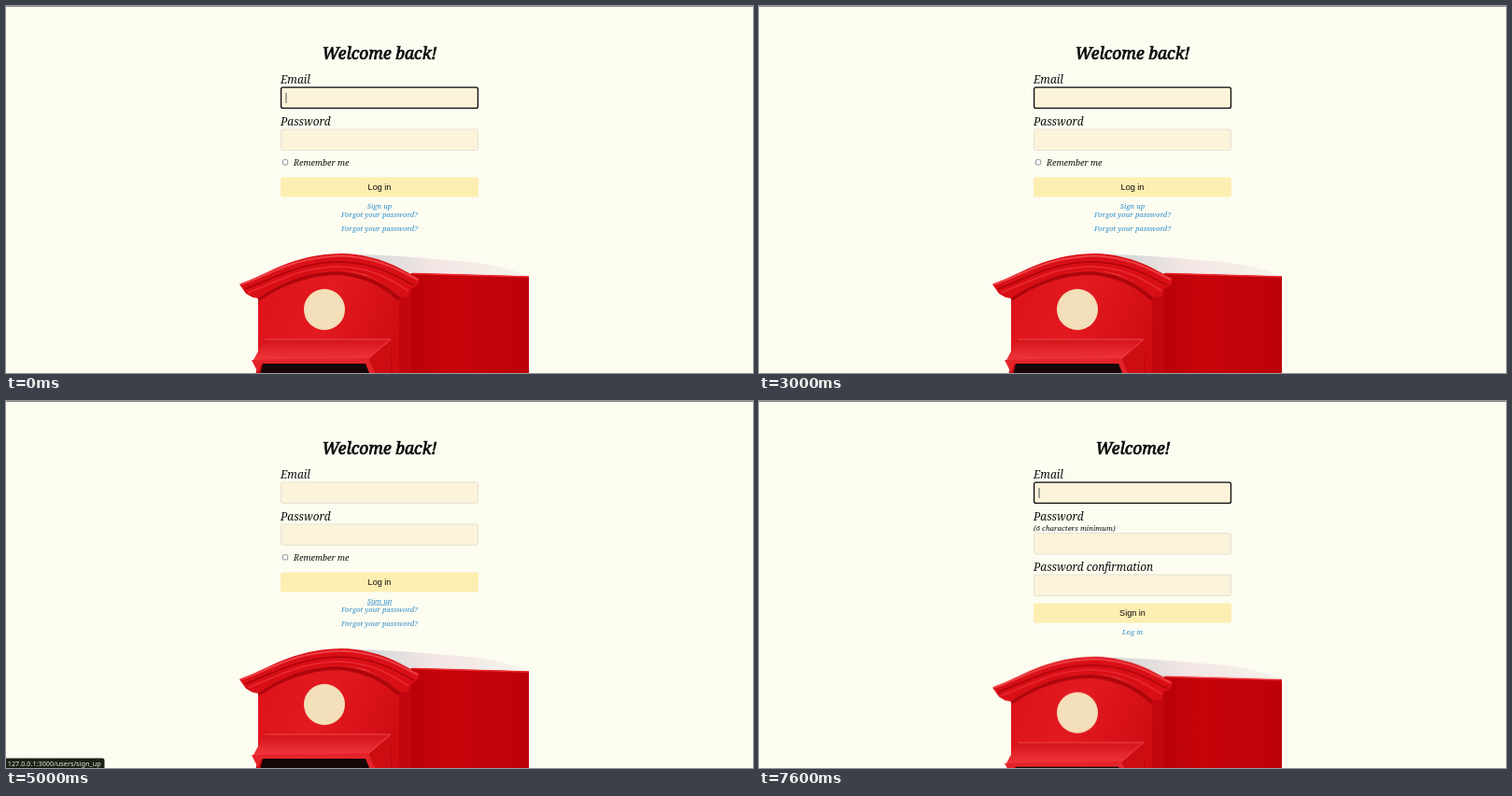
An HTML page for the animation above (8000 ms loop, 800 px wide and 393 px high).

```html
<!DOCTYPE html>
<html lang="en">
<head>
<meta charset="utf-8">
<title>Welcome back</title>
<style>
  html, body { margin: 0; width: 100%; height: 100%; overflow: hidden; background: #fdfcf1; }
  svg { display: block; width: 100vw; height: 100vh; }

  text { font-family: "Noto Serif", serif; font-style: italic; fill: #0c0c0c; }
  .title { font-size: 17.5px; text-anchor: middle; stroke: #0c0c0c; stroke-width: .7px; }
  .label { font-size: 11.8px; }
  .remember { font-size: 9px; }
  .hint { font-size: 7.8px; }
  .link { font-size: 7.65px; text-anchor: middle; fill: #2b8ccb; }
  .button { font: 9.1px "Liberation Sans", Arial, sans-serif; text-anchor: middle; }
  .status text { font: 7.28px "Noto Sans", sans-serif; fill: #e9ebe4; }

  .field { fill: #fbf4da; stroke: #dfdccd; stroke-width: .8; }
  .ring { fill: none; stroke: #0a0a0a; stroke-width: 1.3; }
  .face { fill: #fdeeb1; }

  .login, .signup, .ring, .caret, .status, .hover, .signlink, .box {
    animation: 8s step-end infinite;
  }
  .login { animation-name: login; }
  .signup { animation-name: signup; }
  .box { animation-name: drop; }
  .ring { animation-name: focus; }
  .caret { animation-name: blink; }
  .status { animation-name: status; }
  .hover { animation-name: hover; }
  .signlink { animation-name: underline; }

  @keyframes login { 0% { opacity: 1 } 65%, 100% { opacity: 0 } }
  @keyframes signup { 0% { opacity: 0 } 65%, 100% { opacity: 1 } }
  @keyframes drop { 0% { transform: none } 65%, 100% { transform: translateY(8.7px) } }
  @keyframes focus { 0%, 65%, 100% { opacity: 1 } 62.5% { opacity: 0 } }
  @keyframes blink {
    0%, 15%, 30%, 45%, 60%, 65%, 80%, 95%, 100% { opacity: 1 }
    7.5%, 22.5%, 37.5%, 52.5%, 62.5%, 72.5%, 87.5% { opacity: 0 }
  }
  @keyframes status {
    0%, 72.5%, 100% { opacity: 0 }
    60%, 70% { opacity: .55 }
    62.5% { opacity: 1 }
  }
  @keyframes hover {
    0%, 60%, 100% { opacity: 0 }
    52.5%, 57.5% { opacity: .5 }
    55% { opacity: 1 }
  }
  @keyframes underline {
    0%, 65%, 100% { text-decoration-line: none }
    57.5% { text-decoration-line: underline }
  }
</style>
</head>
<body>
<svg viewBox="0 0 800 393" preserveAspectRatio="none">
  <defs>
    <linearGradient id="front" x2="1" y2=".3">
      <stop stop-color="#dd1219"/><stop offset=".5" stop-color="#e31a20"/><stop offset="1" stop-color="#d00c13"/>
    </linearGradient>
    <linearGradient id="side" x2="1">
      <stop stop-color="#b90208"/><stop offset=".3" stop-color="#c6040a"/><stop offset="1" stop-color="#be0209"/>
    </linearGradient>
    <linearGradient id="top" x2="1">
      <stop stop-color="#cfd6d6"/><stop offset=".45" stop-color="#f3e6e4"/><stop offset="1" stop-color="#f6f3ec"/>
    </linearGradient>
    <linearGradient id="hood" x2="0" y2="1">
      <stop stop-color="#d3141a"/><stop offset="1" stop-color="#f0363b"/>
    </linearGradient>
  </defs>

  <rect width="800" height="393" fill="#fdfcf1"/>
  <rect width="800" height="1" fill="#8b8b87"/>

  <!-- pillar box -->
  <g class="box">
    <path d="M376 266 Q420 267 470 272 Q530 275 560 290 L436 288Z" fill="url(#top)"/>
    <path d="M434 286 L560 289.5V400H434Z" fill="url(#side)"/>
    <path d="M436 286.5 L560 290" stroke="#ee2b31" stroke-width="1.6"/>
    <path d="M270 309 Q310 283 353 282 Q394 285 423 309 L434 300V400H270Z" fill="url(#front)"/>
    <path d="M421 311 L434 300V400H421Z" fill="#c2070e"/>
    <path d="M270 314 Q310 287 354 286 Q393 288 421 314" fill="none" stroke="#ad060c" stroke-width="4"/>
    <path d="M250 298 C281 287 306 266 359 265 C401 266 425 283 443 292 L441 299 434 303 431 311 423 312
             C400 290 379 284 353 283 C322 284 292 298 270 313 L264 312 257 308Z" fill="#d90f16"/>
    <path d="M252 298 C284 287 308 269 359 267.500 C400 269 424 285 441 293" fill="none" stroke="#f04045" stroke-width="2"/>
    <path d="M256 303 C289 291 312 275 358 274 C397 275 419 290 437 299" fill="none" stroke="#a9060c" stroke-width="1.500"/>
    <path d="M259 307 C292 295 314 280 356 279 C393 280 412 293 431 305" fill="none" stroke="#ea2a30" stroke-width="1.600"/>
    <circle cx="341" cy="325" r="22" fill="#f3dfb9"/>
    <path d="M276 357 L412 357 414 400H266Z" fill="#bd080e"/>
    <path d="M277 357H412L388 378 265 379Z" fill="url(#hood)"/>
    <path d="M412 357 L388 378 398 400H412Z" fill="#ce0d13"/>
    <path d="M263 379 L388 377 398 400H390L385 383H274L270 393Z" fill="#e3242a"/>
    <path d="M275 383H385L392 400H271Z" fill="#160607"/>
    <path d="M277 357H412L388 377.500" fill="none" stroke="#f1494d"/>
  </g>

  <!-- shared first field -->
  <text class="label" x="294" y="83.300">Email</text>
  <rect class="field" x="294.500" y="87" width="211" height="22.500" rx="2"/>
  <rect class="ring" x="294.600" y="87.100" width="210.800" height="22.300" rx="2"/>
  <rect class="caret" x="299.500" y="93" width="1" height="11" fill="#555"/>
  <text class="label" x="294" y="128.300">Password</text>

  <g class="login">
    <text class="title" x="400" y="57">Welcome back!</text>
    <rect class="field" x="294.500" y="132" width="211" height="22.500" rx="2"/>
    <rect x="296.500" y="164.700" width="5.200" height="5.200" rx="1" fill="#fff" stroke="#777" stroke-width=".8"/>
    <text class="remember" x="308" y="170.800">Remember me</text>
    <rect class="face" x="294" y="183.500" width="212" height="21" rx="2"/>
    <rect class="hover" x="294" y="183.500" width="212" height="21" rx="2" fill="#f6e291"/>
    <text class="button" x="400" y="197">Log in</text>
    <text class="link signlink" x="400" y="216.800">Sign up</text>
    <text class="link" x="400" y="226.300">Forgot your password?</text>
    <text class="link" x="400" y="241.300">Forgot your password?</text>
  </g>

  <g class="signup">
    <text class="title" x="400.500" y="57">Welcome!</text>
    <text class="hint" x="294" y="138.800">(6 characters minimum)</text>
    <rect class="field" x="294.500" y="141.500" width="211" height="22.500" rx="2"/>
    <text class="label" x="294" y="182.300">Password confirmation</text>
    <rect class="field" x="294.500" y="186" width="211" height="22.500" rx="2"/>
    <rect class="face" x="294" y="216.500" width="212" height="21" rx="2"/>
    <text class="button" x="400" y="229.800">Sign in</text>
    <text class="link" x="400" y="249.800">Log in</text>
  </g>

  <g class="status">
    <path d="M0 382.500H103Q105.500 382.500 105.500 385V393H0Z" fill="#1c2118"/>
    <text x="1.800" y="390.700">127.0.0.1:3000/users/sign_up</text>
  </g>
</svg>
</body>
</html>
```
